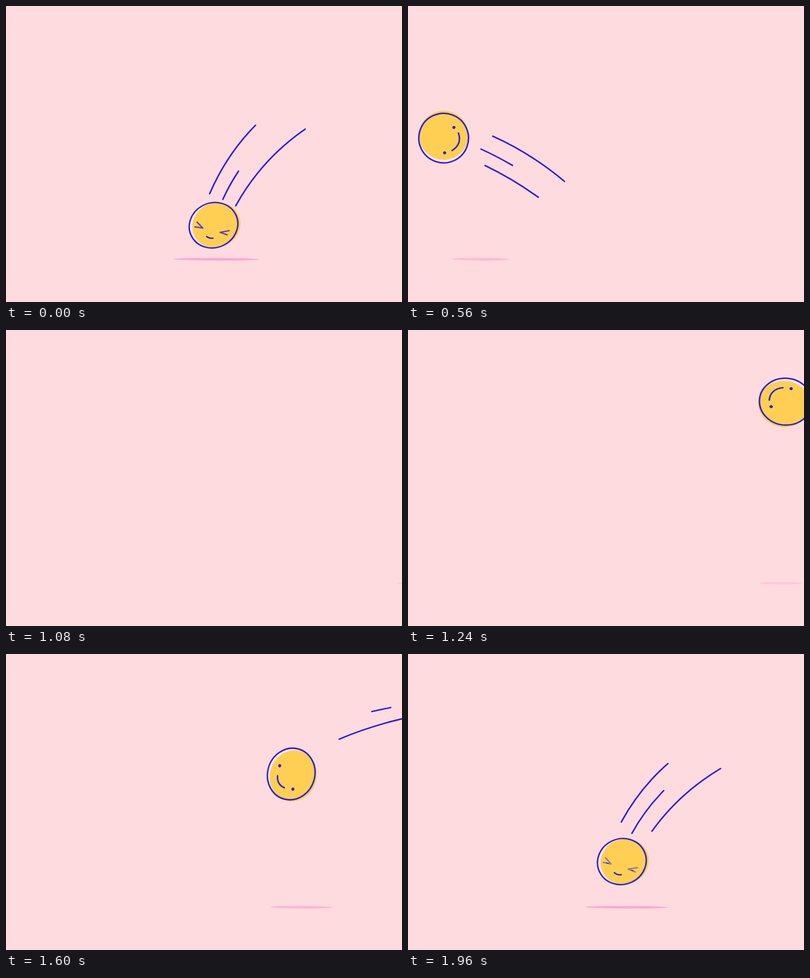
Write an HTML page that moves like this. It is 800x600 px and loops after 2000 ms.

```html
<!DOCTYPE html>
<html lang="en">
<head>
<meta charset="utf-8">
<title>Bouncing ball</title>
<style>
  html, body { margin: 0; width: 100%; height: 100%; overflow: hidden; background: #fedbde; }
  svg { display: block; width: 800px; height: 600px; }
  .ink { fill: none; stroke: #2a20dc; stroke-width: 3; stroke-linecap: round; stroke-linejoin: round; }
  .dot { fill: #2a20dc; }
</style>
</head>
<body>
<svg viewBox="0 0 800 600">
  <ellipse id="shadow" ry="2.6" fill="#fda6d6"/>
  <g id="trails" class="ink"></g>
  <g id="ball">
    <circle r="50" fill="#ffe4e8"/>
    <circle cx="5.5" cy="-1.8" r="49.5" fill="#ffcf53"/>
    <circle class="ink" r="50"/>
    <ellipse class="dot" cx="-27.3" cy="12" rx="3.1"/>
    <ellipse class="dot" cx="27.3" cy="12" rx="3.1"/>
    <path id="squint" class="ink" d="M-35 2.2L-19.5 11.5L-36 13M35 3.2L18 11.5L34 13"/>
    <path id="mouth" class="ink" transform="translate(1)"/>
  </g>
</svg>
<script>
const LOOP = 2000;
const HIT = 2040;   // moment of contact, shortly after the loop restarts
const SWAP = 1040;  // the ball is off stage: it has left and is about to return
const GROUND = { x: 407.5, y: 468 };

const $ = id => document.getElementById(id);
const clamp = v => Math.max(0, Math.min(1, v));
const mix = (a, b, u) => a + (b - a) * u;

// Distance covered d ms away from the bounce
const travel = (d, speed, accel, jerk = 0) => d * (speed + d * (accel + d * jerk));

const linear = u => u;
const easeIn = u => u * u;

// Each trail is a quadratic curve; its head and tail run along it in [start, end] ms.
const trails = [
  // falling in from the right
  { curve: [[806, 104], [496, 148], [400, 409]], head: [1547, 2028], tail: [1568, 2267], ease: linear },
  { curve: [[806, 130], [518, 196], [432, 406]], head: [1459, 2020], tail: [1806, 2044], ease: linear },
  { curve: [[806, 163], [545, 226], [448, 437]], head: [1694, 2027], tail: [1744, 2315], ease: linear },
  // bouncing out to the left
  { curve: [[410, 450], [232, 238], [-20, 214]], head: [2101, 2872], tail: [2020, 3100], ease: easeIn },
  { curve: [[405, 485], [230, 286], [-20, 236]], head: [2064, 2833], tail: [2162, 2726], ease: easeIn },
  { curve: [[375, 490], [225, 319], [-20, 262]], head: [2094, 2857], tail: [2069, 2917], ease: easeIn }
];
for (const trail of trails) {
  trail.el = document.createElementNS("http://www.w3.org/2000/svg", "path");
  $("trails").append(trail.el);
}

const progress = ([start, end], time) => clamp((time - start) / (end - start));

// Control point of the curve for the parameter pair (u, v)
function blossom([a, b, c], u, v) {
  return [0, 1].map(k => mix(mix(a[k], b[k], u), mix(b[k], c[k], u), v).toFixed(2)).join(" ");
}

function drawTrail({ el, curve, head, tail, ease }, time) {
  const from = ease(progress(tail, time)), to = progress(head, time);
  el.setAttribute("d", to - from < .005 ? "" :
    `M${blossom(curve, from, from)}Q${blossom(curve, from, to)} ${blossom(curve, to, to)}`);
}

function drawBall(d, falling) {
  const x = GROUND.x + (falling ? travel(d, .293, .00023, -5e-8) : -travel(d, .734, -.000173));
  const y = GROUND.y - (falling ? travel(d, .614, -.000195, -8.5e-8) : travel(d, .611, -.000435));
  const turn = 15 + (falling ? travel(d, .034, .000145) : -travel(d, .111, .0001));

  // Squashed at the bounce, stretched or round away from it
  const scale = Math.min(50.2, 47.2 + .009 * d) / 50;
  const stretch = Math.min(falling ? .055 : 0, .00024 * d - .055);
  $("ball").setAttribute("transform", `translate(${x} ${y}) rotate(${turn + 50}) ` +
    `scale(${scale * (1 + stretch)} ${scale * (1 - stretch)}) rotate(-50)`);

  const squeeze = clamp(1.15 - d / 130);
  $("squint").setAttribute("opacity", squeeze * .9);
  for (const dot of document.querySelectorAll(".dot"))
    dot.setAttribute("ry", 3.1 * clamp(1 - 1.25 * squeeze));

  const w = Math.min(18.8, 6.2 + d * (falling ? .0175 : .0245));
  const end = 29 - .24 * w;
  $("mouth").setAttribute("d", `M${-w} ${end}Q0 ${end + w - 4} ${w} ${end}`);
}

function drawShadow(d, falling) {
  const x = GROUND.x + d * (falling ? .432 : -.5);
  const half = 89 - .058 * d;
  const shadow = $("shadow");
  shadow.setAttribute("rx", half);
  shadow.setAttribute("opacity", clamp(.5 + (half - 50) / 72));
  shadow.setAttribute("transform", `translate(${x} 513.3) rotate(.3)`);
}

function draw(t) {
  // One pass runs from SWAP, through the bounce, to SWAP of the next loop.
  const time = t < SWAP ? t + LOOP : t;
  const falling = time < HIT;
  const d = Math.abs(time - HIT);
  drawBall(d, falling);
  drawShadow(d, falling);
  for (const trail of trails) drawTrail(trail, time);
}

function tick() {
  draw(performance.now() % LOOP);
  requestAnimationFrame(tick);
}
tick();
</script>
</body>
</html>
```
